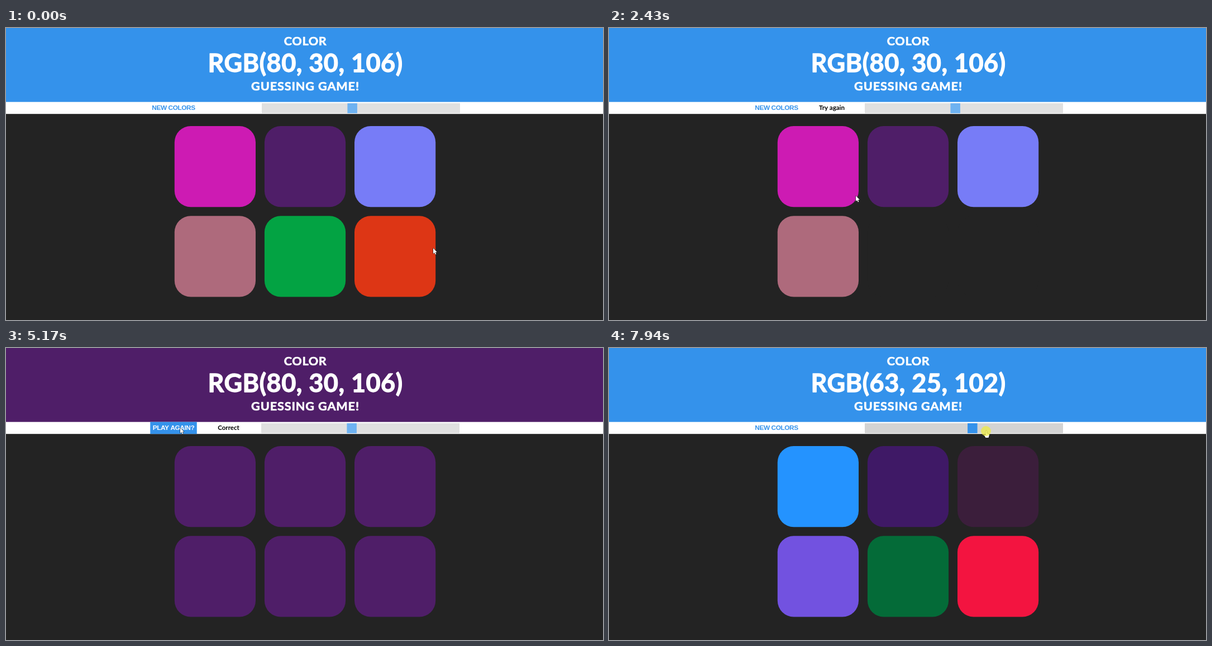
These frames come from a looping animation (1069 by 524 pixels, 7990 ms). An HTML page with a canvas:

```html
<!DOCTYPE html>
<html lang="en">
<head>
<meta charset="utf-8">
<title>Color guessing game</title>
<style>
  html, body { margin: 0; width: 100%; height: 100%; overflow: hidden; background: #232323; }
  canvas { display: block; width: 1069px; height: 524px; }
</style>
</head>
<body>
<canvas id="stage" width="1069" height="524"></canvas>
<script>
const ctx = document.getElementById('stage').getContext('2d');
const hex = s => [0, 2, 4].map(i => parseInt(s.slice(i, i + 2), 16));
const palette = s => s.split(' ').map(hex);

const BLUE = hex('3492eb'), LIGHT_BLUE = hex('6eb2f1'), WHITE = hex('ffffff'), DARK = hex('232323');
const FIRST = palette('cd1bb3 4f1e68 777cf7 ae6a7c 03a343 dd3615');
const SECOND = palette('2493ff 3f1966 3b1e3b 7252e0 046b38 f31440');
const ANSWER = FIRST[1];

const LOOP = 7990, FADE = 600, PRESS = 140;
const MISSES = { 5: 560, 4: 1720, 0: 2690 };   // square: time of the wrong guess
const WON = 3880, RESET = 5230, DRAG = 7440;
const CLICKS = [...Object.values(MISSES), WON, RESET];
const BUTTON_ON = 4990, BUTTON_OFF = 5850, SLIDER_ON = 5970;

// pointer path: leave, arrive, x, y
const GRAB_X = 634;
const PATH = [
  [0, 0, 765, 395],
  [30, 400, 714, 411],
  [930, 1350, 543, 392],
  [1770, 2420, 442, 301],
  [2500, 2600, 422, 272],
  [3330, 3570, 517, 261],
  [4600, 5100, 312, 143],
  [5730, 6270, 690, 145],
  [6830, 6950, GRAB_X, 140],
  [DRAG, 7930, 675, 149]
];

const clamp = v => Math.max(0, Math.min(1, v));
const smooth = v => v * v * (3 - 2 * v);
const mix = (a, b, p) => a.map((v, i) => v + (b[i] - v) * p);
const css = c => `rgb(${c.map(Math.round).join(',')})`;

// the CSS "ease" curve, cubic-bezier(.25, .1, .25, 1)
function ease(x) {
  if (x <= 0 || x >= 1) return clamp(x);
  let lo = 0, hi = 1, s = .5;
  for (let i = 0; i < 20; i++) {
    s = (lo + hi) / 2;
    if (.75 * s * (1 - s) + s ** 3 < x) lo = s; else hi = s;
  }
  return .3 * s * (1 - s) ** 2 + 3 * s * s * (1 - s) + s ** 3;
}
const transition = (t, start, span = 200) => ease((t - start) / span);

function pointerAt(t) {
  let p = PATH[0].slice(2);
  for (const [leave, arrive, x, y] of PATH) {
    if (t > leave) p = mix(p, [x, y], smooth(clamp((t - leave) / (arrive - leave))));
  }
  return p;
}

function squareColor(i, t) {
  let c = FIRST[i];
  if (i in MISSES) c = mix(c, DARK, transition(t, MISSES[i], FADE));
  c = mix(c, ANSWER, transition(t, WON, FADE));
  return mix(c, SECOND[i], transition(t, RESET, FADE));
}

function rect(x, y, w, h, color) {
  ctx.fillStyle = css(color);
  ctx.fillRect(x, y, w, h);
}

function label(str, x, y, font, color, spacing = 0, round = 0) {
  ctx.font = font;
  ctx.letterSpacing = spacing + 'px';
  ctx.textAlign = 'center';
  ctx.fillStyle = ctx.strokeStyle = css(color);
  ctx.fillText(str, x, y);
  if (round) {
    ctx.lineJoin = 'round';
    ctx.lineWidth = round;
    ctx.strokeText(str, x, y);
  }
}

const rounded = size => `bold ${size}px Lato, sans-serif`;
const BUTTON_FONT = 'bold 11.8px "Liberation Sans", Arial, sans-serif';

function drawHeader(t, won) {
  rect(0, 0, 1069, 133, won ? ANSWER : BLUE);
  const rgb = t < RESET ? 'RGB(80, 30, 106)' : 'RGB(63, 25, 102)';
  label('COLOR', 536, 31, rounded(21.6), WHITE, .6, .7);
  label(rgb, 536, 79, rounded(45), WHITE, .5, 1.3);
  label('GUESSING GAME!', 536, 112, rounded(21.6), WHITE, .9, .7);
}

function drawBar(t, won, pointerX) {
  rect(0, 132.7, 1069, 21.5, WHITE);

  const hover = transition(t, BUTTON_ON) - transition(t, BUTTON_OFF);
  const w = won ? 83.5 : 85.5;
  ctx.globalAlpha = hover;
  rect(300 - w / 2, 132.7, w, 21.5, BLUE);
  ctx.globalAlpha = 1;
  label(won ? 'PLAY AGAIN?' : 'NEW COLORS', 300, 147, BUTTON_FONT, mix(BLUE, WHITE, hover), -.4);

  const black = [0, 0, 0];
  if (won) label('Correct', 398.5, 147, rounded(11.5), black);
  else if (t >= MISSES[5] && t < WON) label('Try again', 399, 147, rounded(11.5), black);

  const x = won ? 457 : 458;
  const active = transition(t, SLIDER_ON);
  const notch = t > DRAG && pointerX - GRAB_X > 15 ? 6 : 5;
  rect(x, 135, 355, 18, mix(hex('e0e0e0'), hex('d3d3d3'), active));
  rect(x + 337.5 * notch / 11, 135, 17.5, 18, mix(LIGHT_BLUE, BLUE, active));
}

function drawSquares(t) {
  for (let i = 0; i < 6; i++) {
    const col = i % 3, row = Math.floor(i / 3);
    ctx.fillStyle = css(squareColor(i, t));
    ctx.beginPath();
    ctx.roundRect(301.8 + col * 161.1, 176 + row * 161.3, 145.2, 145.2, 29);
    ctx.fill();
  }
}

const ARROW = new Path2D('M0 0V10L2.3 8L3.8 11.5L5.4 10.8L3.9 7.4L6.8 7.2Z');
const HAND = new Path2D('M-.7 8V0Q.5-1.6 1.7 0V4L5 5Q6 5.5 5.7 8L4.5 12H-.5L-3.6 7Q-3.4 5-.7 8Z');

function drawPointer(t, [x, y]) {
  const shape = t < SLIDER_ON ? ARROW : HAND;
  ctx.save();
  ctx.translate(x, y);
  ctx.fillStyle = '#fff';
  ctx.strokeStyle = '#111';
  ctx.lineWidth = 1;
  ctx.stroke(shape);
  ctx.fill(shape);
  if (t >= DRAG || CLICKS.some(c => t >= c - PRESS && t < c)) {
    // the reset click is a shorter tap
    if (!(t < RESET - 50 && t > WON)  || t >= DRAG) {
      ctx.fillStyle = 'rgba(240, 236, 60, .7)';
      ctx.beginPath();
      ctx.arc(0, 0, 9, 0, Math.PI * 2);
      ctx.fill();
    }
  }
  ctx.restore();
}

function draw(t) {
  const won = t >= WON && t < RESET;
  const pointer = pointerAt(t);
  rect(0, 0, 1069, 524, DARK);
  drawHeader(t, won);
  drawBar(t, won, pointer[0]);
  drawSquares(t);
  drawPointer(t, pointer);
}

const begin = performance.now();
function tick() {
  draw((performance.now() - begin) % LOOP);
  requestAnimationFrame(tick);
}
tick();
</script>
</body>
</html>
```
